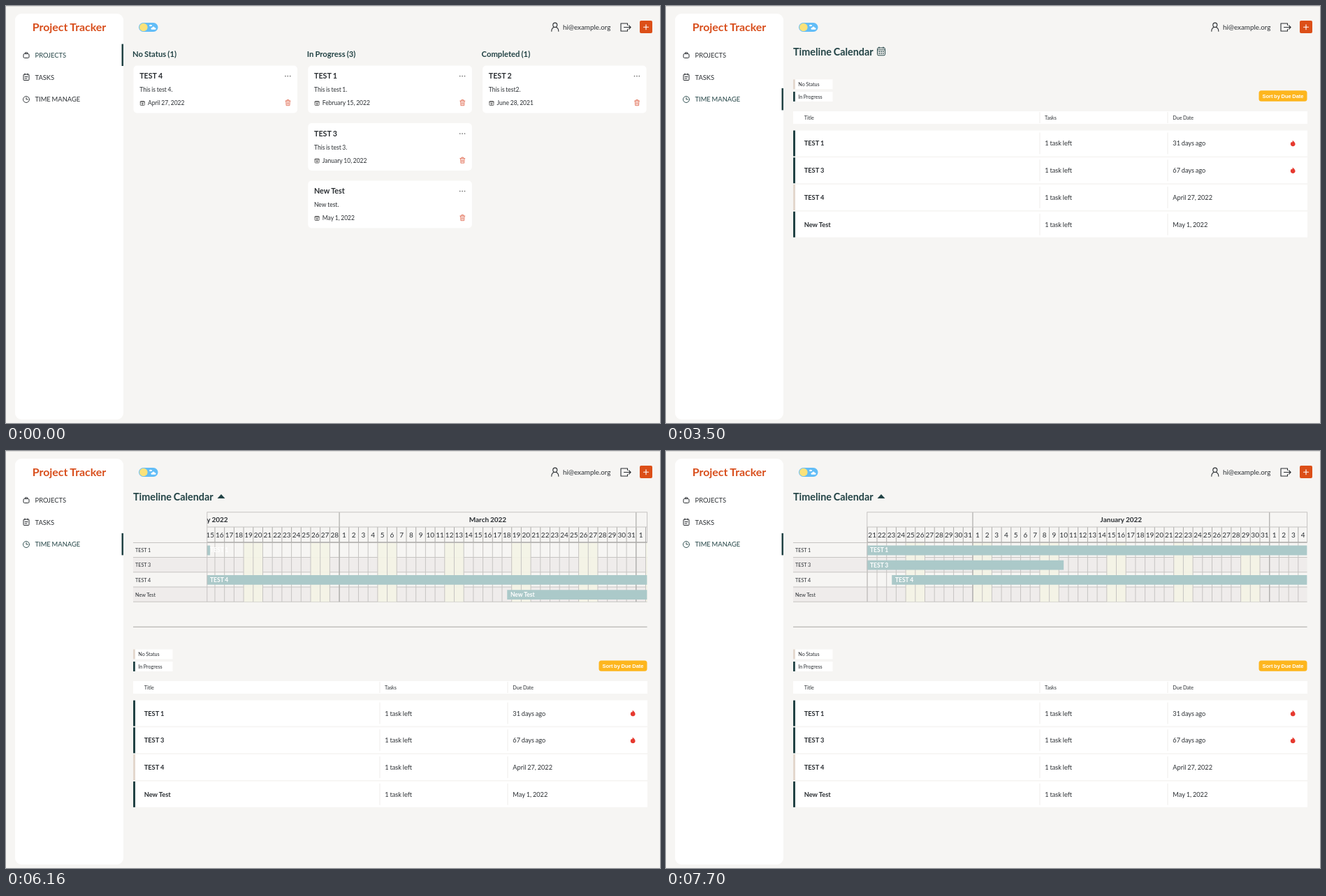
Animation, 936 px wide and 598 px high, one loop 8000 ms. Source, as an HTML page with a canvas:

```html
<!DOCTYPE html>
<html lang="en">
<head>
<meta charset="utf-8">
<title>Project Tracker</title>
<style>
html, body { margin: 0; width: 100%; height: 100%; overflow: hidden; background: #f6f5f3; }
canvas { display: block; width: 936px; height: 598px; }
</style>
</head>
<body>
<canvas id="stage"></canvas>
<script>
const W = 936, H = 598, LOOP = 8000, STEP = 70;
const PAGE_AT = 2100, OPEN_AT = 4130;
const BG = '#f6f5f3', DARK = '#224345', INK = '#2b2f33', ORANGE = '#d84e1c', BEIGE = '#e3d7cd';
const canvas = document.getElementById('stage');
const ctx = canvas.getContext('2d');
const ratio = window.devicePixelRatio || 1;
canvas.width = W * ratio;
canvas.height = H * ratio;

// y is the middle of the capital letters
function text(s, x, y, size, { color = INK, weight = 400, align = 'left', family = 'Lato, sans-serif' } = {}) {
  ctx.font = `${weight} ${size}px ${family}`;
  ctx.wordSpacing = `${-size * 0.06}px`;
  ctx.fillStyle = color;
  ctx.textAlign = align;
  ctx.fillText(s, x, y + size * 0.36);
}

function box(x, y, w, h, color, radius = 0) {
  ctx.fillStyle = color;
  ctx.beginPath();
  ctx.roundRect(x, y, w, h, radius);
  ctx.fill();
}

function frame(x, y, w, h, color, width = 1, radius = 0) {
  ctx.strokeStyle = color;
  ctx.lineWidth = width;
  ctx.beginPath();
  ctx.roundRect(x, y, w, h, radius);
  ctx.stroke();
}

function path(d, x, y, color, width) {
  ctx.save();
  ctx.translate(x, y);
  const p = new Path2D(d);
  if (width) {
    ctx.strokeStyle = color;
    ctx.lineWidth = width;
    ctx.lineCap = ctx.lineJoin = 'round';
    ctx.stroke(p);
  } else {
    ctx.fillStyle = color;
    ctx.fill(p);
  }
  ctx.restore();
}

function dot(x, y, r, color) {
  ctx.fillStyle = color;
  ctx.beginPath();
  ctx.arc(x, y, r, 0, Math.PI * 2);
  ctx.fill();
}

const vline = (x, y1, y2, color, w = 1) => box(x - w / 2, y1, w, y2 - y1, color);
const hline = (x1, x2, y, color, w = 1) => box(x1, y - w / 2, x2 - x1, w, color);

function drawSidebar(active) {
  box(13, 11, 155, 582, '#fff', 9);
  text('Project Tracker', 90.5, 30.7, 15.9, { color: ORANGE, weight: 700, align: 'center' });
  ['PROJECTS', 'TASKS', 'TIME MANAGE'].forEach((label, i) => {
    const color = i === active ? DARK : INK;
    text(label, 41.5, 70.6 + i * 31.7, 9.4, { color });
  });
  box(165.5, 54.5 + active * 31.7, 2.5, 31.5, DARK);
  frame(25, 68.5, 8, 6, INK, 1, 1.5);
  path('M-1.7 0v-1.5h3.4V0', 29, 68.3, INK, 1);
  frame(25, 98, 8, 8.5, INK, 1, 1);
  path('M-2 -5v2M2 -5v2M-2 -.5h4M-2 2h3', 29, 102, INK, 1);
  path('M4.5 0A4.5 4.5 0 1 1 -4.5 0A4.5 4.5 0 1 1 4.5 0M0 -2.7V0H2.4', 29, 134, active === 2 ? DARK : INK, 0.9);
}

function drawTopbar() {
  box(190, 24, 27.5, 13, '#62bdf7', 6.5);
  dot(196.8, 30.5, 5.8, '#fbe27a');
  dot(206.5, 28, 1.3, '#fff');
  dot(208, 28, 1.1, '#fff');
  box(207.5, 31.3, 7, 2.4, '#fff', 1.2);
  dot(211, 31.3, 1.7, '#fff');
  path('M3 -3A3 3.2 0 1 1 -3 -3A3 3.2 0 1 1 3 -3M-5 6C-5 2.5 -3 .8 -1.5 .3M5 6C5 2.5 3 .8 1.5 .3', 785.8, 30.3, INK, 1.1);
  text('hi@example.org', 797, 30.5, 9.8);
  path('M3 -3V-5.5H-6.5V5.5H3V3M-2 0H7.5M5 -2.6L7.6 0L5 2.6', 886.5, 30.5, INK, 1.1);
  box(907, 21, 18, 18, '#dc4f18', 2);
  path('M-3.5 0h7M0 -3.5v7', 916, 30.2, '#fff', 1.1);
}

function drawCard(x, y, title, note, date) {
  box(x, y, 234.5, 68, '#fff', 5);
  text(title, x + 8.7, y + 15, 10.7, { weight: 700 });
  text(note, x + 8.7, y + 34.8, 8.5);
  text(date, x + 20.5, y + 53.9, 8.5);
  for (let i = -1; i <= 1; i++) dot(x + 220.8 + i * 3.4, y + 15, 0.85, '#666');
  frame(x + 9.8, y + 51, 6, 6, '#444', 0.8, 0.8);
  path('M-3 -1.5h6M-1.2 1h2.4M0 -.2v2.4', x + 12.8, y + 53.7, '#444', 0.8);
  path('M-3.5 -2.6h7M-1.4 -2.8v-1.3h2.8v1.3M-2.8 -2.4l.4 6.4h4.8l.4 -6.4M-.9 -.8v3.2M.9 -.8v3.2', x + 221, y + 53.2, '#e2725a', 0.9);
}

const columns = [
  ['No Status', [['TEST 4', 'This is test 4.', 'April 27, 2022']]],
  ['In Progress', [
    ['TEST 1', 'This is test 1.', 'February 15, 2022'],
    ['TEST 3', 'This is test 3.', 'January 10, 2022'],
    ['New Test', 'New test.', 'May 1, 2022']]],
  ['Completed', [['TEST 2', 'This is test2.', 'June 28, 2021']]]
];

function drawBoard() {
  columns.forEach(([name, cards], c) => {
    const x = 182.5 + c * 249.8;
    text(`${name} (${cards.length})`, x - 1.5, 69.2, 11.25, { color: DARK, weight: 700 });
    cards.forEach((card, r) => drawCard(x, 85.5 + r * 82.5, ...card));
  });
}

const rows = [
  ['TEST 1', '31 days ago', DARK, true],
  ['TEST 3', '67 days ago', DARK, true],
  ['TEST 4', 'April 27, 2022', BEIGE, false],
  ['New Test', 'May 1, 2022', DARK, false]
];

function drawTable(top) {
  ctx.save();
  ctx.translate(0, top);
  [['No Status', BEIGE], ['In Progress', DARK]].forEach(([label, color], i) => {
    const y = 105.3 + i * 17.6;
    box(182, y, 56.5, 14, '#fff');
    box(182, y, 2.8, 14, color);
    text(label, 189.3, y + 7.2, 7.2);
  });
  box(848.5, 121.3, 69, 15.4, '#fdb61e', 3.5);
  text('Sort by Due Date', 883, 129, 7.5, { color: '#fff', weight: 700, align: 'center', family: '"Liberation Sans", Arial, sans-serif' });
  box(182, 151, 736, 18, '#fff');
  text('Title', 197.7, 160.4, 7.2);
  text('Tasks', 542, 160.4, 7.2);
  text('Due Date', 725.3, 160.4, 7.2);
  for (const x of [535, 718]) vline(x, 152, 168, '#efedeb');
  rows.forEach(([name, due, color, late], i) => {
    const y = 178.5 + i * 38.75;
    box(182, y, 736, 37, '#fff');
    box(182, y, 3, 37, color);
    text(name, 197.7, y + 18.6, 9.3, { weight: 700 });
    text('1 task left', 542.3, y + 18.6, 9.2);
    text(due, 725.3, y + 18.6, 9.2);
    for (const x of [535, 718]) vline(x, y + 3, y + 34, '#efedeb');
    if (late) path('M-.4 -4.6C.4 -3.2 3.4 -1.7 3.4 1.1C3.4 3.1 1.8 4.2 0 4.2C-1.8 4.2 -3.4 3.1 -3.4 1.1C-3.4 -.5 -2.5 -1.5 -2 -2.2L-1.3 -1.3C-.4 -2.2 -.3 -3.4 -.4 -4.6Z', 897.2, y + 18.5, '#e6392f');
  });
  ctx.restore();
}

// Gantt days are counted from April 1, 2022
const DAY = 13.7, LEFT = 287.8, RIGHT = 917.6;
const lanes = [131.4, 152.6, 173.8, 195, 216.2];
const bars = [[-150, -44.5], [-150, -80.5], [-98.45, 26.5], [-13.47, 30.5]];
const months = [[-121, 'December 2021', 31], [-90, 'January 2022', 31], [-59, 'February 2022', 28],
  [-31, 'March 2022', 31], [0, 'April 2022', 30], [30, 'May 2022', 31]];

// Swipes: start, end, resting place of April 1
const swipes = [[5390, 5670, 596], [6020, 6230, 940], [6580, 6930, 1238.7], [7000, 7210, 1360.3], [7490, 7700, 1672]];

function originAt(t) {
  let x = 485.5;
  for (const [from, to, rest] of swipes) {
    const u = Math.max(0, Math.min(1, (t - from) / (to - from)));
    x += (rest - x) * u * (2 - u);
    if (u < 1) break;
  }
  return x;
}

function drawGantt(origin) {
  const line = '#c6c4c2', strong = '#adacaa', bottom = lanes[4];
  rows.forEach(([name], i) => {
    if (i % 2) box(182, lanes[i], RIGHT - 182, 21.2, '#efeceb');
    text(name, 185, lanes[i] + 11.2, 7.2);
  });
  for (const y of lanes) hline(182, RIGHT, y, line);

  ctx.save();
  ctx.beginPath();
  ctx.rect(LEFT - 0.5, 87, RIGHT - LEFT + 0.5, 130);
  ctx.clip();
  const first = Math.floor((LEFT - origin) / DAY), last = Math.ceil((RIGHT - origin) / DAY);
  for (let d = first; d <= last; d++) {
    const x = origin + d * DAY;
    const date = new Date(Date.UTC(2022, 3, 1 + d));
    if (date.getUTCDay() % 6 === 0) box(x, 132, DAY, bottom - 132, 'rgba(245,245,230,.92)');
    vline(x, 109, 131, strong);
    vline(x, 131, bottom, line);
    text(date.getUTCDate(), x + DAY / 2, 120, 10, { align: 'center' });
  }
  for (const [d, name, length] of months) {
    const x = origin + d * DAY;
    vline(x, 88, bottom, strong, 1.2);
    text(name, x + length * DAY / 2, 98.6, 10, { weight: 700, align: 'center' });
  }
  bars.forEach(([from, to], i) => {
    const x = Math.max(LEFT - 0.5, origin + from * DAY);
    const end = Math.min(RIGHT, origin + to * DAY);
    if (end <= LEFT || x >= RIGHT) return;
    box(x, lanes[i] + 4.2, end - x, 13.8, '#abc9c9');
    text(rows[i][0], x + 4.7, lanes[i] + 11, 8.5, { color: '#fff', weight: 700 });
  });
  ctx.restore();

  hline(LEFT, RIGHT, 87.8, line);
  hline(LEFT, RIGHT, 109, line);
  hline(LEFT, RIGHT, 130.8, strong, 1.2);
  vline(LEFT, 87.5, bottom, line);
  vline(RIGHT, 87.5, 131, line);
  hline(182, RIGHT, 252.2, '#a8a7a5');
}

function drawTimeline(t) {
  const open = t >= OPEN_AT;
  text('Timeline Calendar', 182, 65.5, 14.4, { color: DARK, weight: 700 });
  if (open) {
    path('M-5.5 3L0 -3L5.5 3Z', 308, 65, DARK);
    drawGantt(originAt(t));
  } else {
    frame(302.5, 60, 11, 10.8, DARK, 1, 1.5);
    hline(302.5, 313.5, 62.8, DARK, 0.9);
    vline(305, 58.5, 61, DARK);
    vline(311, 58.5, 61, DARK);
    for (let i = 0; i < 6; i++) box(304.4 + i % 3 * 2.8, 64.6 + Math.floor(i / 3) * 2.8, 1.6, 1.6, DARK);
  }
  drawTable(open ? 179.1 : 0);
}

function statusAlpha(t) {
  const rise = (t - 1400) / 210, fall = (2940 - t) / 210;
  return Math.max(0, Math.min(1, rise, fall));
}

function drawStatus(alpha) {
  if (!alpha) return;
  ctx.save();
  ctx.globalAlpha = alpha;
  box(-3, 593, 245, 10, '#6b2b33', 2.5);
  text('https://project-tracker-app.example/time', 2, 599.3, 9.5, { color: '#fff' });
  ctx.restore();
}

function draw(t) {
  ctx.setTransform(ratio, 0, 0, ratio, 0, 0);
  box(0, 0, W, H, BG);
  hline(0, W, 0.3, '#d6d5d3', 0.8);
  const onTime = t >= PAGE_AT;
  drawSidebar(onTime ? 2 : 0);
  drawTopbar();
  if (onTime) drawTimeline(t);
  else drawBoard();
  drawStatus(statusAlpha(t));
}

const start = performance.now();
function tick() {
  const t = (performance.now() - start) % LOOP;
  draw(Math.floor(t / STEP) * STEP);
  requestAnimationFrame(tick);
}
tick();
</script>
</body>
</html>
```
